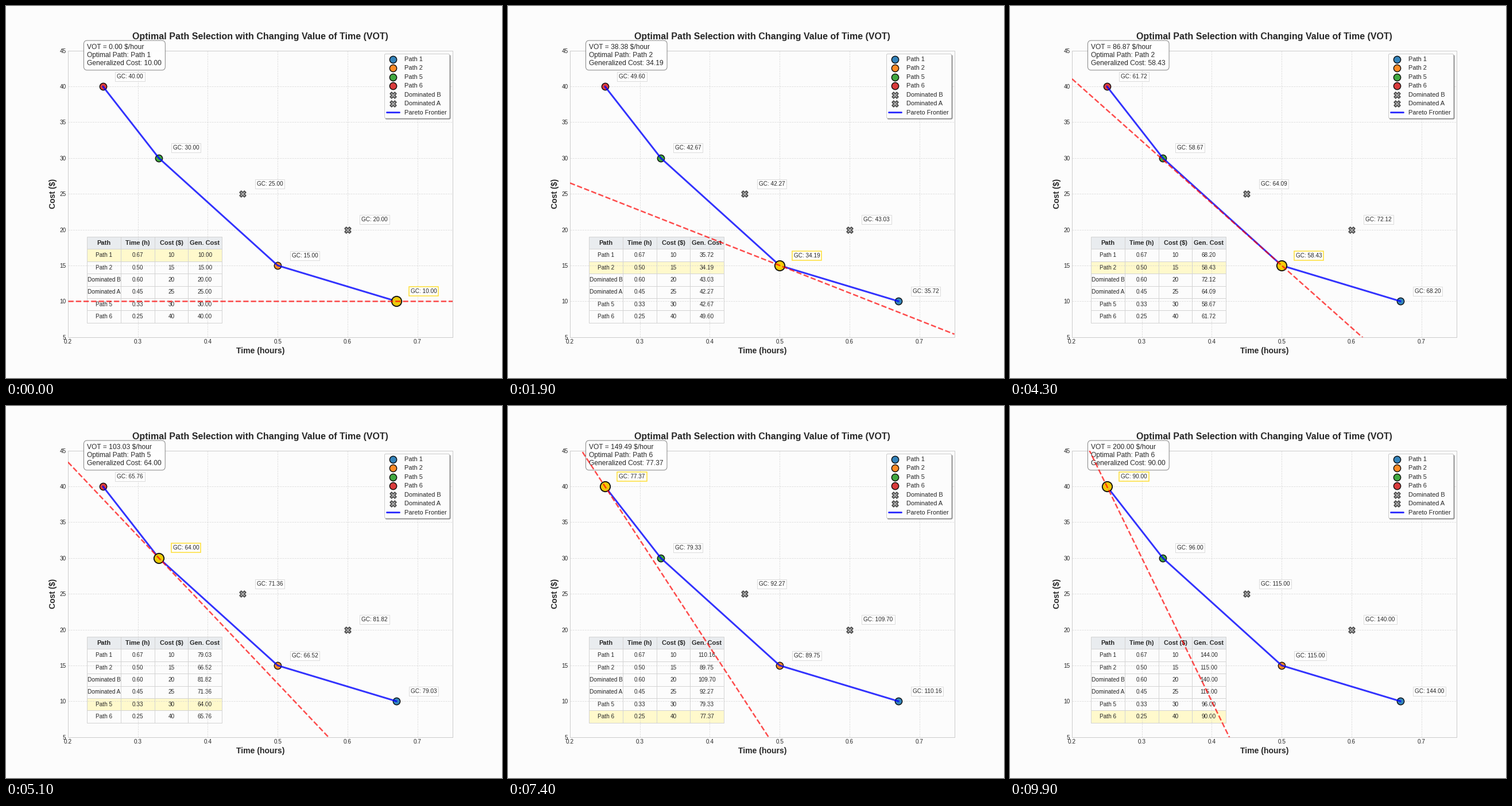
A matplotlib script that plays this animation: 864x648 px, repeating every 10 s.

```python
import numpy as np
import matplotlib.pyplot as plt
from matplotlib.animation import FuncAnimation

FRAMES = 100
BG = "#fcfcfc"
ROW_HIGHLIGHT = "#fff9cc"
HEADER = ["Path", "Time (h)", "Cost ($)", "Gen. Cost"]

# name, time (h), cost ($), colour (None when dominated)
PATHS = [
    ("Path 1", 0.67, 10, "#1f77b4"),
    ("Path 2", 0.50, 15, "#ff7f0e"),
    ("Dominated B", 0.60, 20, None),
    ("Dominated A", 0.45, 25, None),
    ("Path 5", 0.33, 30, "#2ca02c"),
    ("Path 6", 0.25, 40, "#d62728"),
]
names = [p[0] for p in PATHS]
times = np.array([p[1] for p in PATHS])
costs = np.array([p[2] for p in PATHS])
votes = np.linspace(0, 200, FRAMES)

plt.style.use("seaborn-v0_8-whitegrid")
plt.rcParams.update({
    "font.family": "Liberation Sans",
    "figure.facecolor": BG,
    "savefig.facecolor": BG,
    "axes.facecolor": BG,
})

fig, ax = plt.subplots(figsize=(12, 9), dpi=72)
ax.set(xlim=(0.2, 0.75), ylim=(5, 45))
ax.grid(True, linestyle="--", alpha=0.7)
ax.set_title("Optimal Path Selection with Changing Value of Time (VOT)",
             fontsize=16, fontweight="bold", pad=20)
ax.set_xlabel("Time (hours)", fontsize=14, fontweight="bold")
ax.set_ylabel("Cost ($)", fontsize=14, fontweight="bold")

efficient = [p for p in PATHS if p[3]]
dominated = [p for p in PATHS if not p[3]]
for name, t, c, color in efficient:
    ax.scatter(t, c, s=150, color=color, edgecolor="black", linewidth=1.5,
               alpha=0.9, label=name)
for name, t, c, _ in dominated:
    ax.scatter(t, c, s=120, color="gray", marker="X", edgecolor="black",
               linewidth=1.5, alpha=0.7, label=name)
ax.plot([p[1] for p in efficient], [p[2] for p in efficient], color="blue",
        lw=3, alpha=0.8, label="Pareto Frontier")
ax.legend(loc="upper right", fontsize=11, frameon=True, shadow=True)

indiff, = ax.plot([], [], color="red", ls="--", lw=2.5, alpha=0.7, zorder=6)
marker = ax.scatter([0], [0], s=300, color="gold", edgecolor="black",
                    linewidth=2, alpha=0.9, zorder=5)

tags = [
    ax.text(t + 0.02, c + 1, "", fontsize=10, va="bottom",
            bbox=dict(facecolor="white", edgecolor="lightgray", alpha=0.8,
                      boxstyle="square,pad=0.3"))
    for t, c in zip(times, costs)
]
info = ax.text(0.05, 0.95, "", transform=ax.transAxes, fontsize=12,
               bbox=dict(boxstyle="round,pad=0.5", facecolor="white",
                         edgecolor="gray", alpha=0.95))

rows = [[n, f"{t:.2f}", f"{c}", ""] for n, t, c, _ in PATHS]
table = ax.table(cellText=rows, colLabels=HEADER, cellLoc="center",
                 bbox=[0.05, 0.05, 0.35, 0.3])
table.auto_set_font_size(False)
for (row, _), cell in table.get_celld().items():
    cell.set(edgecolor="lightgray", facecolor=BG)
    cell.set_text_props(fontsize=10)
    if row == 0:
        cell.set_facecolor("#e9ecef")
        cell.set_text_props(fontsize=11, fontweight="bold")


def update(i):
    vot = votes[i]
    gen = costs + vot * times
    best = int(np.argmin(gen))

    x = np.array(ax.get_xlim())
    indiff.set_data(x, costs[best] - vot * (x - times[best]))
    marker.set_offsets([[times[best], costs[best]]])
    info.set_text(f"VOT = {vot:.2f} $/hour\n"
                  f"Optimal Path: {names[best]}\n"
                  f"Generalized Cost: {gen[best]:.2f}")

    for k, (tag, g) in enumerate(zip(tags, gen)):
        on = k == best
        tag.set_text(f"GC: {g:.2f}")
        box = tag.get_bbox_patch()
        box.set_edgecolor("gold" if on else "lightgray")
        box.set_linewidth(1.5 if on else 1)
        table[k + 1, 3].get_text().set_text(f"{g:.2f}")
        for col in range(len(HEADER)):
            table[k + 1, col].set_facecolor(ROW_HIGHLIGHT if on else BG)
    return indiff, marker, info, *tags, table


anim = FuncAnimation(fig, update, frames=FRAMES, interval=100, repeat=True,
                     repeat_delay=0, blit=False)
plt.show()
```
